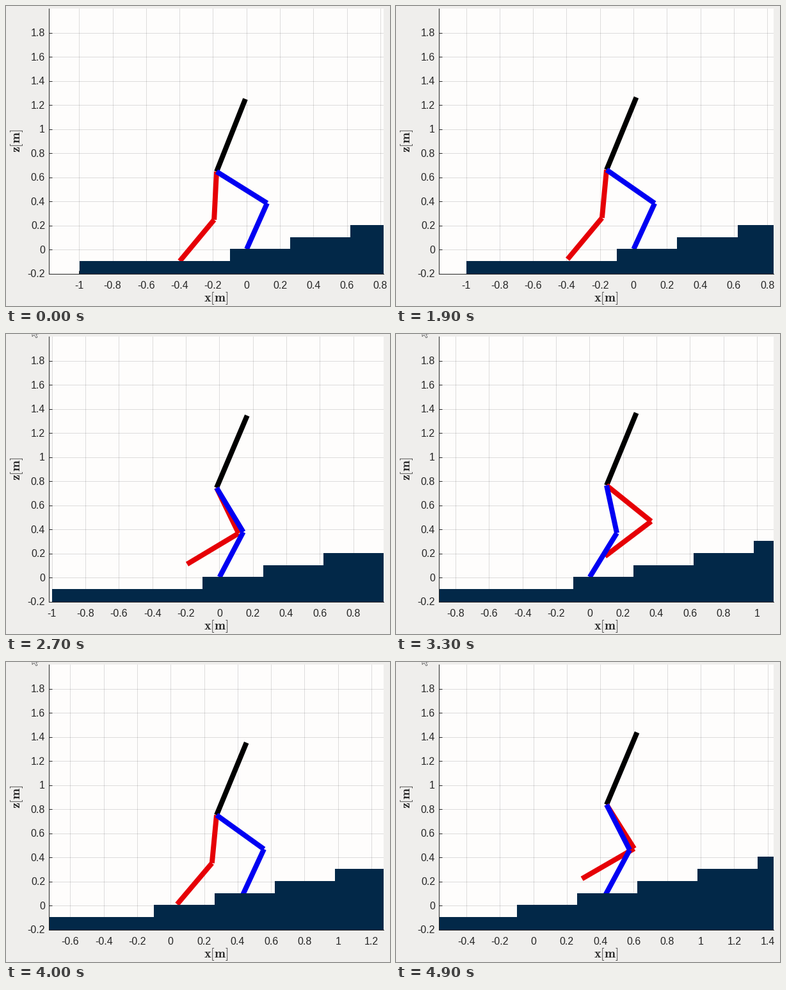
Animation, 600 px wide and 467 px high, one loop 5000 ms. Source, as a matplotlib script:

```python
import matplotlib.pyplot as plt
import numpy as np
from matplotlib.animation import FuncAnimation
from matplotlib.patches import Polygon
from matplotlib.ticker import MultipleLocator
from matplotlib.transforms import Affine2D

W, H, DPI = 600, 467, 64
LEFT, RIGHT, TOP, BOTTOM = 67.2, 590.2, 4.1, 416.6
PT = 72 / DPI  # points per pixel
INK = "#262626"

FRAMES, START, STEP_TIME = 50, 18, 20.7
STRIDE, RISE = 0.43, 0.085
LINK, TORSO = 0.4, 0.627

plt.rcParams["font.family"] = "Liberation Sans"
plt.rcParams["mathtext.fontset"] = "cm"


def gait(s):
    """Hip, swing foot and torso lean at phase s, relative to the stance foot."""
    hip = np.array([-0.18 + 0.371 * s + 0.059 * s ** 5,
                    0.643 + 0.319 * s - 0.2155 * s ** 2])
    foot = np.array([-0.4 + 0.85 * s ** 1.7,
                     -0.1 + 0.185 * s + 0.153 * np.sin(np.pi * s ** 1.4)])
    lean = 0.278 + 0.019 * np.sin(np.pi * s ** 0.6)
    return hip, foot, lean


def find_knee(hip, foot):
    """Forward-bending knee between hip and foot."""
    d = foot - hip
    dist = np.hypot(*d)
    bend = np.sqrt(max(LINK ** 2 - dist ** 2 / 4, 0))
    return (hip + foot) / 2 + bend * np.array([-d[1], d[0]]) / dist


fig = plt.figure(figsize=(W / DPI, H / DPI), dpi=DPI, facecolor="#efeeec")
ax = fig.add_axes([LEFT / W, 1 - BOTTOM / H, (RIGHT - LEFT) / W, (BOTTOM - TOP) / H],
                  facecolor="#fefdfc")
ax.set_ylim(-0.2, 1.9995)
ax.set_axisbelow(True)
ax.grid(color=INK, alpha=0.15, linewidth=PT)
for axis in (ax.xaxis, ax.yaxis):
    axis.set_major_locator(MultipleLocator(0.2))
ax.tick_params(direction="in", length=5 * PT, width=PT, color=INK,
               labelbottom=False, labelleft=False)
for side, spine in ax.spines.items():
    spine.set_visible(side in ("left", "bottom"))
    spine.set(linewidth=PT, color=INK, zorder=7)

# Grid lines snap to whole pixels; the drawing itself sits slightly higher
art = ax.transData + Affine2D().translate(0.3, 0.7)

label_style = dict(fontsize=16 * PT, color=INK, va="baseline")
for n in range(-1, 10):
    y = 1 - (BOTTOM - (n / 5 + 0.2) * 187.5 + 5.7) / H
    fig.text(61 / W, y, f"{n / 5:g}", ha="right", **label_style)
x_labels = [
    ax.text(n / 5, (BOTTOM - 439.5) / (BOTTOM - TOP), f"{n / 5:g}", ha="center",
            transform=ax.get_xaxis_transform(), **label_style)
    for n in range(-5, 8)
]

name_style = dict(fontsize=20.2 * PT, color=INK, ha="center")
fig.text(328.5 / W, 1 - 460 / H, r"$\mathbf{x[m]}$", va="baseline", **name_style)
fig.text(17 / W, 1 - 210 / H, r"$\mathbf{z[m]}$", va="center", rotation=90, **name_style)

# Staircase
edges = [-1] + [-0.1 + 0.36 * i for i in range(6)]
outline = [(-1, -0.22)]
for i, (a, b) in enumerate(zip(edges, edges[1:])):
    outline += [(a, 0.1 * i - 0.1), (b, 0.1 * i - 0.1)]
outline += [(edges[-1], 0.4), (edges[-1], -0.22)]
ax.add_patch(Polygon(outline, facecolor="#022848", linewidth=0, zorder=6, transform=art))


def make_link(color, order):
    return ax.plot([], [], color=color, linewidth=8 * PT, transform=art,
                   solid_capstyle="butt", zorder=order)[0]


torso = make_link("black", 3)
swing = [make_link("#e60006", 4) for _ in range(2)]
stance = [make_link("#0000f2", 5) for _ in range(2)]

# Mouse pointer, mostly above the top edge
POINTER = np.array([(41, -8), (41, 4), (44, 1), (47, 6), (49, 5), (46.5, 0), (50.5, 0)])
pointer = Polygon(POINTER, facecolor="white", edgecolor="#555555", linewidth=0.8 * PT)
pointer.set_transform(fig.transFigure)
fig.add_artist(pointer)


def set_link(line, a, b):
    line.set_data([a[0], b[0]], [a[1], b[1]])


def set_leg(leg, hip, foot):
    knee = find_knee(hip, foot)
    set_link(leg[0], hip, knee)
    set_link(leg[1], knee, foot)


def draw(k):
    step, phase = divmod(max(k - START, 0) / STEP_TIME, 1)
    base = step * np.array([STRIDE, RISE])
    hip, foot, lean = gait(phase)
    hip = hip + base
    set_link(torso, hip, hip + TORSO * np.array([np.sin(lean), np.cos(lean)]))
    set_leg(swing, hip, foot + base)
    set_leg(stance, hip, base)

    ax.set_xlim(hip[0] - 1, hip[0] + 1)
    for label in x_labels:
        label.set_visible(abs(label.get_position()[0] - hip[0]) <= 1)

    shift = -5 if k < 22 else 0
    pointer.set_xy([((x + shift) / W, 1 - y / H) for x, y in POINTER])
    pointer.set_visible(k >= 20)
    return []


anim = FuncAnimation(fig, draw, frames=FRAMES, interval=100, repeat=True, repeat_delay=0)
plt.show()
```
